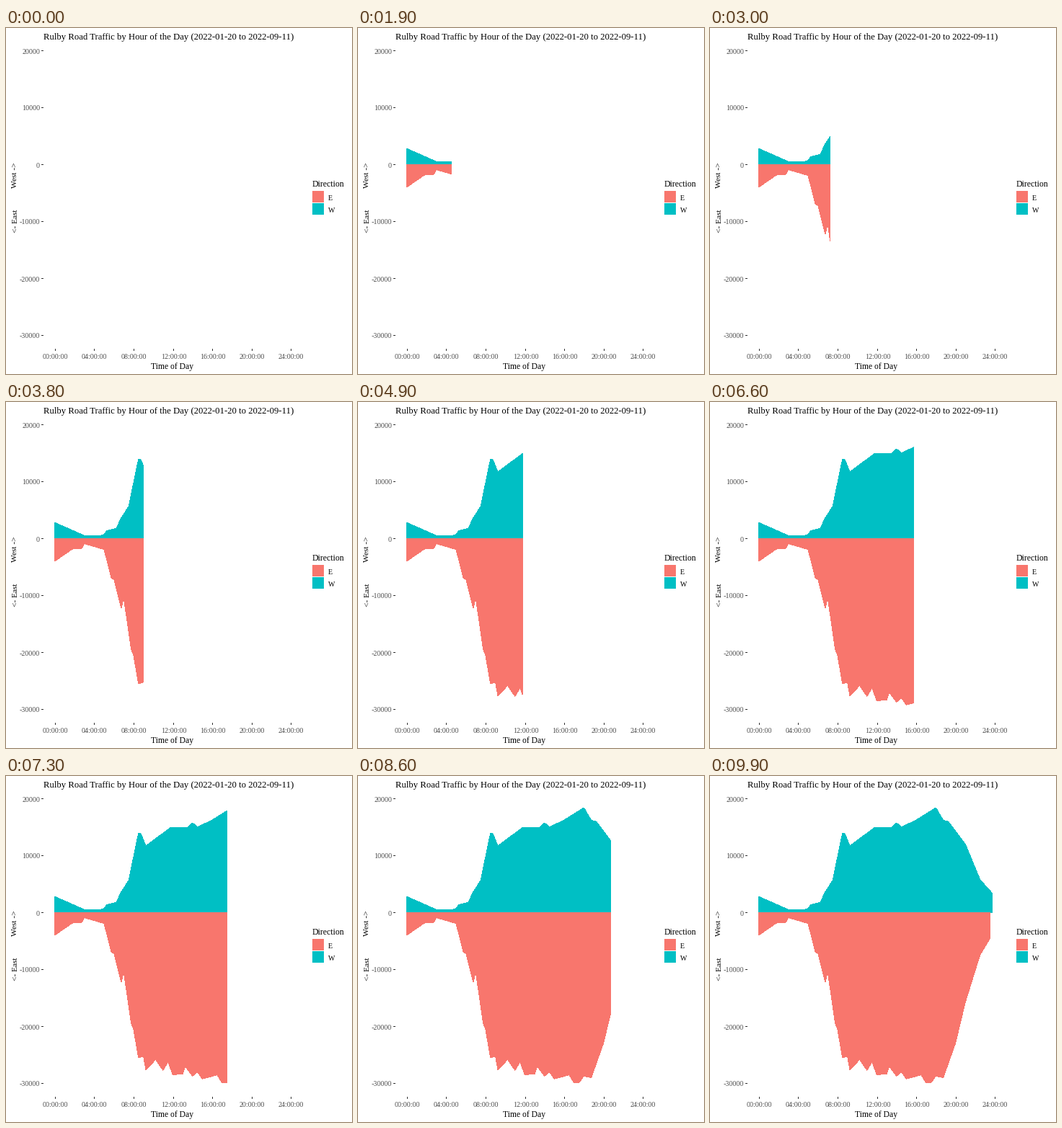
Animation of 480x480 px, one loop 10000 ms. Source, as a matplotlib script:

```python
import numpy as np
import matplotlib.pyplot as plt
from matplotlib.animation import FuncAnimation
from matplotlib.patches import Polygon, Rectangle

plt.rcParams["font.family"] = "Liberation Serif"

SIZE, DPI = 480, 72
FRAMES, INTERVAL = 100, 100
RED, TEAL = "#F8766D", "#00BFC4"
GREY, TICK = "#4D4D4D", "#333333"
X0, HOUR = 67.85, 13.639     # midnight and pixels per hour
Y0, UNIT = 189.5, 7.9        # zero line and pixels per 1000 vehicles
STEP, LAST = 0.25, 23.75     # hours between readings, last reading

# Turning points of each curve: hour, thousands of vehicles
WEST = [(0, 2.8), (3, .5), (4.5, .45), (5, .7), (5.25, 1.35), (6.25, 1.8),
        (6.75, 3.65), (7.5, 5.6), (8.5, 13.95), (8.75, 13.85), (9.25, 11.7),
        (11.75, 14.9), (13.5, 14.9), (14, 15.75), (14.5, 15), (16, 16.25),
        (18, 18.4), (18.75, 16.2), (19.25, 16), (21, 12), (22.5, 5.75),
        (23.75, 3.35)]
EAST = [(0, 3.95), (1.75, 1.85), (2.75, 1.7), (3, .9), (5, 1.9), (5.75, 7),
        (6, 7.1), (6.75, 12.2), (7, 10.4), (7.75, 19.4), (8, 20.5),
        (8.5, 25.5), (9, 25.2), (9.25, 27.6), (10.25, 25.8), (11, 27.7),
        (11.5, 26.2), (12, 28.5), (13, 28.3), (13.25, 27), (14, 28.7),
        (14.5, 28), (15, 29.2), (16.5, 28.5), (17, 29.9), (17.5, 29.9),
        (18, 28.7), (18.75, 29), (20, 22.9), (21, 15.7), (22.5, 7.4),
        (23.5, 4.55)]

readings = np.arange(0, LAST + STEP, STEP)
# Each reading snaps to its nearest frame; the gaps are interpolated
arrival = np.round(readings / LAST * (FRAMES - 1))

fig = plt.figure(figsize=(SIZE / DPI, SIZE / DPI), dpi=DPI, facecolor="white")
ax = fig.add_axes([0, 0, 1, 1])
ax.set(xlim=(0, SIZE), ylim=(SIZE, 0))
ax.axis("off")


def label(x, y, text, size, color="black", ha="left", **kw):
    ax.text(x, y, text, fontsize=size, color=color, ha=ha, va="baseline", **kw)


def box(x, y, w, h, color):
    ax.add_patch(Rectangle((x, y), w, h, fc=color, ec="none", aa=False))


def area(color):
    return ax.add_patch(Polygon([(0, 0)] * 3, fc=color, ec="none", aa=False))


label(51.5, 16, "Rulby Road Traffic by Hour of the Day (2022-01-20 to 2022-09-11)", 12.72)
label(230.3, 473, "Time of Day", 11.6, ha="center")
for y, text, ha in [(186, "West ->", "right"), (284, "<- East", "left")]:
    label(15.5, y, text, 11.4, ha=ha, rotation=90, rotation_mode="anchor")

for v in range(-30, 21, 10):
    y = Y0 - v * UNIT
    box(49, int(y), 3, 1, TICK)
    label(47, y + 4, str(v * 1000), 10, GREY, "right")
for h in range(0, 25, 4):
    x = round(X0 + h * HOUR)
    box(x, 445, 1, 3, TICK)
    label(x + .4, 459, f"{h:02d}:00:00", 10, GREY, "center")

label(424.5, 220, "Direction", 11.7)
for y, color, text in [(226, RED, "E"), (243, TEAL, "W")]:
    box(425, y, 16, 16, color)
    label(447, y + 13, text, 10)

west, east = area(TEAL), area(RED)


def reveal(patch, keys, now, sign):
    """Show the curve from midnight up to the hour `now`."""
    hours, counts = zip(*keys)
    now = min(now, hours[-1])
    t = np.append(np.arange(0, now, STEP), now)
    x = X0 + t * HOUR
    y = Y0 - sign * UNIT * np.interp(t, hours, counts)
    outline = np.column_stack([x, y])
    patch.set_xy(np.vstack([(x[0], Y0), outline, (x[-1], Y0)]))
    patch.set_visible(now > 0)


def update(i):
    now = np.interp(i, arrival, readings)
    reveal(west, WEST, now, 1)
    reveal(east, EAST, now, -1)
    return west, east


anim = FuncAnimation(fig, update, frames=FRAMES, interval=INTERVAL,
                     repeat=True, repeat_delay=0)
plt.show()
```
